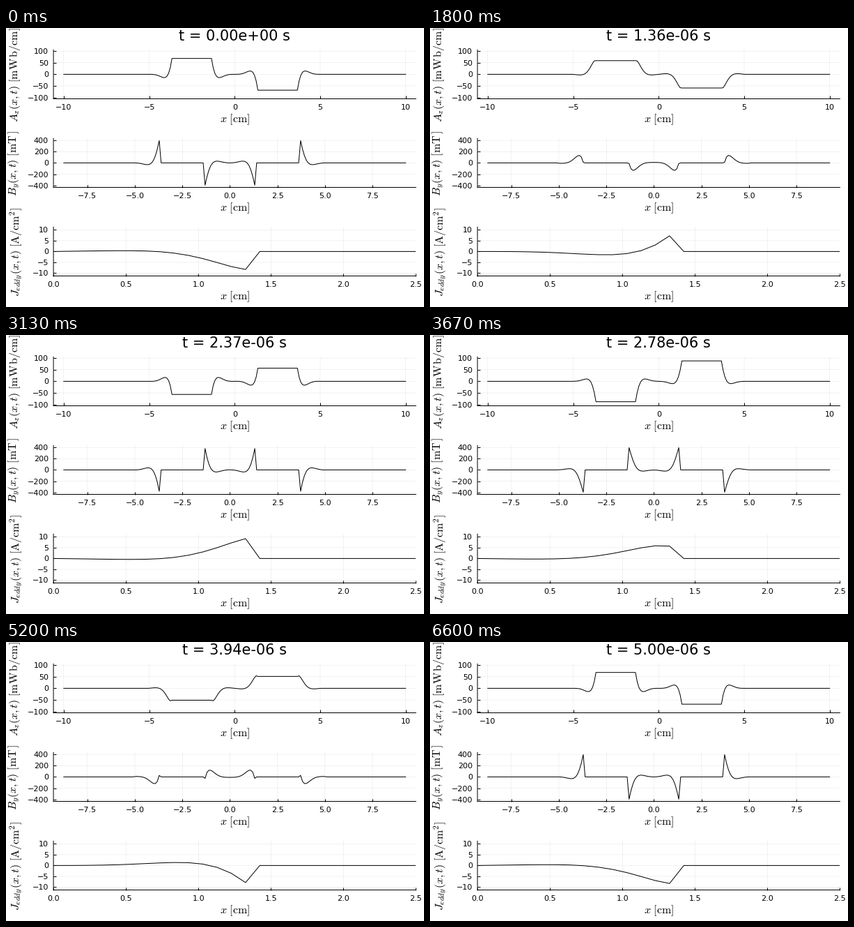
Recreate the animation shown at these times as a matplotlib script. Size 600 by 400 pixels, loop 6.67 s.

```python
import numpy as np
import matplotlib.pyplot as plt
from matplotlib.animation import FuncAnimation

W, H = 600, 400
FRAMES = 100
PERIOD = 5e-6  # s, one cycle of the drive

plt.rcParams.update({
    "font.family": "DejaVu Sans",
    "mathtext.fontset": "cm",
    "font.size": 8,
    "path.simplify": False,
    "path.snap": False,
})

# Phasors of a field soaking into conductors on both sides of each gap
EDGE, DELTA = 1.357, 0.287
K = (1 + 1j) / DELTA


def soak(d, depth, k):
    return np.sinh(k * d) / np.sinh(k * depth)


x = np.linspace(-10, 10, 200)
dx = x[1] - x[0]
dist = np.clip(np.minimum(abs(x), 50 * dx - abs(x)), 0, EDGE)
a_phasor = -np.sign(x) * 97.4 * np.exp(-1j * np.radians(45.4)) * soak(dist, EDGE, K)

mid = (x[1:] + x[:-1]) / 2
shown = (mid > -8.78) & (mid < 9.28)
x_b = mid[shown]
b_phasor = (np.diff(a_phasor) / dx)[shown]

J_EDGE, J_STEP = 1.325, 0.0983
x_in = J_EDGE - J_STEP * np.arange(14, -1, -1)
j_in = 10.3 * np.exp(-1j * np.radians(53.7 + 90)) * soak(x_in, J_EDGE, (1 + 1j) / 0.28)
x_j = np.append(x_in, [J_EDGE + J_STEP, 2.5])
j_phasor = np.append(j_in, [0, 0])

fig = plt.figure(figsize=(W / 100, H / 100), dpi=100, facecolor="white")


def label(px, py, text, **kw):
    return fig.text(px / W, 1 - py / H, text, ha="center", va="baseline",
                    rotation_mode="anchor", **kw)


def panel(mid_y, xlim, ymax, xticks, yticks, name, name_x):
    left, width, height = 68.1, 520.3, 70.2
    bottom = mid_y + height / 2
    ax = fig.add_axes([left / W, 1 - bottom / H, width / W, height / H])
    ax.set(xlim=xlim, ylim=(-ymax, ymax), xticks=xticks, yticks=yticks)
    ax.spines[["top", "right"]].set_visible(False)
    ax.spines[["left", "bottom"]].set_linewidth(0.72)
    ax.tick_params(direction="in", length=3.2, width=0.72, pad=5.1)
    ax.grid(color="black", alpha=0.1, linewidth=0.36)
    ax.set_axisbelow(True)
    label(328.2, bottom + 33.5, r"$x\ [\mathrm{cm}]$", fontsize=11.5)
    label(name_x, mid_y + 0.8, name, fontsize=11.5, rotation=90)
    return ax.plot([], [], color="black", linewidth=0.72)[0]


lines = [
    panel(66.4, (-10.6, 10.6), 105.5, range(-10, 11, 5), range(-100, 101, 50),
          r"$A_z(x,t)\ [\mathrm{mW\,b/cm}]$", 17),
    panel(193.4, (-9.284, 9.786), 436, np.arange(-7.5, 8, 2.5), range(-400, 401, 200),
          r"$B_y(x,t)\ [\mathrm{mT\,}]$", 15.3),
    panel(320.4, (0, 2.5), 11.3, np.arange(0, 2.6, 0.5), range(-10, 11, 5),
          r"$J_{eddy}(x,t)\ [\mathrm{A/cm^2}]$", 20),
]
curves = [(x, a_phasor), (x_b, b_phasor), (x_j, j_phasor)]
title = label(328.3, 18.5, "", fontsize=15)


def update(i):
    t = PERIOD * i / (FRAMES - 1)
    turn = np.exp(2j * np.pi * t / PERIOD)
    for line, (xs, phasor) in zip(lines, curves):
        line.set_data(xs, (phasor * turn).real)
    title.set_text(f"t = {t:.2e} s")
    return [*lines, title]


anim = FuncAnimation(fig, update, frames=FRAMES, interval=66.6,
                     repeat=True, repeat_delay=0)
plt.show()
```
